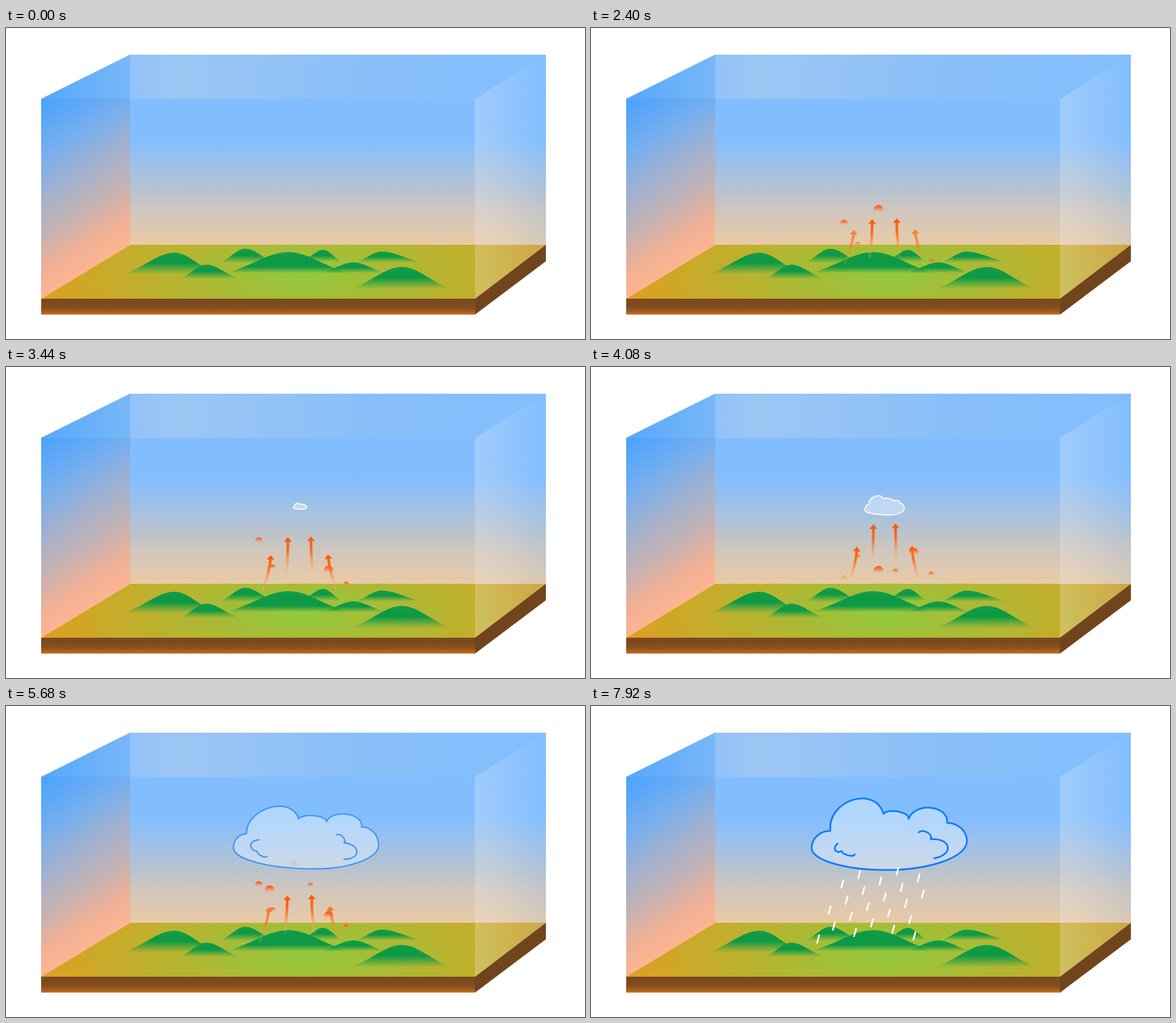
Write an HTML page with a canvas that moves like this. It is 1021 px wide and 548 px high and loops after 8 s.

```html
<!DOCTYPE html>
<html lang="en">
<head>
<meta charset="utf-8">
<title>Cloud formation</title>
<style>
html, body { margin: 0; width: 100%; height: 100%; overflow: hidden; background: #fff; }
canvas { display: block; width: 100vw; height: 100vh; }
</style>
</head>
<body>
<canvas id="stage" width="1021" height="548"></canvas>
<script>
const W = 1021, H = 548, LOOP = 8000, STEP = 80;
const stage = document.getElementById('stage').getContext('2d');

const clamp = v => Math.max(0, Math.min(1, v));
const lerp = (a, b, k) => a + (b - a) * k;
// Blends numbers or nested lists of numbers.
const mix = (a, b, k) => Array.isArray(a) ? a.map((v, i) => mix(v, b[i], k)) : lerp(a, b, k);

function gradient(c, x0, y0, x1, y1, stops) {
  const g = c.createLinearGradient(x0, y0, x1, y1);
  stops.forEach(([at, color]) => g.addColorStop(at, color));
  return g;
}

function poly(c, fill, ...pts) {
  c.fillStyle = fill;
  c.beginPath();
  pts.forEach(([x, y]) => c.lineTo(x, y));
  c.closePath();
  c.fill();
}

// ---------- scenery ----------

// Corners of the box: front (F) and back (B), left/right, top/bottom.
const FLT = [62, 125], FRT = [827, 125], FLB = [62, 477], FRB = [827, 477];
const BLT = [219, 47], BRT = [952, 47], BLB = [219, 382], BRB = [952, 382];

function drawWalls(c) {
  poly(c, gradient(c, 0, 47, 0, 382, [
    [0, '#82beff'], [0.44, '#82beff'], [0.61, '#a3c1e4'],
    [0.73, '#bac3cc'], [0.82, '#cfc6bd'], [1, '#e9caa5']
  ]), BLT, BRT, BRB, BLB);

  // Colour bands of the left wall run parallel to its lower edge.
  const ux = 0.53, uy = 0.85;
  poly(c, gradient(c, 139 * ux, 139 * uy, 440 * ux, 440 * uy, [
    [0, '#49a2ff'], [0.28, '#76aeee'], [0.5, '#a4b1cd'],
    [0.67, '#c2b2b4'], [0.85, '#eeb097'], [1, '#ffb48f']
  ]), FLT, BLT, BLB, FLB);

  poly(c, gradient(c, 62, 0, 219, 0, [[0, '#55a8fc'], [1, '#78b7f8']]), FLT, BLT, [219, 125]);
  poly(c, gradient(c, 219, 0, 952, 0, [
    [0, '#92c2f9'], [0.1, '#9cc6f4'], [0.2, '#99c5f4'], [0.55, '#89bff9'], [1, '#82beff']
  ]), [219, 125], BLT, BRT, FRT);
}

function drawGround(c) {
  c.save();
  c.beginPath();
  [FLB, BLB, BRB, FRB].forEach(p => c.lineTo(...p));
  c.clip();
  c.translate(525, 435);
  c.scale(460, 170);
  const g = c.createRadialGradient(0, 0, 0, 0, 0, 1);
  [[0, '#92c93d'], [0.3, '#a6bc36'], [0.6, '#bdb12e'], [1, '#dca022']]
    .forEach(([at, color]) => g.addColorStop(at, color));
  c.fillStyle = g;
  c.fillRect(-2, -2, 4, 4);
  c.restore();

  poly(c, gradient(c, 0, 477, 0, 505, [
    [0, '#7a481f'], [0.5, '#814d20'], [0.75, '#985820'], [1, '#c87222']
  ]), FLB, FRB, [827, 505], [62, 505]);
  poly(c, '#71451c', FRB, BRB, [952, 411], [827, 505]);
}

// Smooth slope between a foot and a peak, drawn upwards or downwards.
function slope(c, foot, peak, up) {
  const low = mix(foot, peak, 0.5), high = [lerp(foot[0], peak[0], 0.7), peak[1]];
  c.bezierCurveTo(...(up ? [...low, ...high, ...peak] : [...high, ...low, ...foot]));
}

function hill(c, left, peak, right, top, base, solid = 0.48) {
  c.fillStyle = gradient(c, 0, top, 0, base, [
    [0, '#149d49'], [0.3, '#0e9945'], [solid, '#0e9945'], [1, 'rgba(14,153,69,0)']
  ]);
  c.beginPath();
  c.moveTo(left, base);
  slope(c, [left, base], [peak, top], true);
  slope(c, [right, base], [peak, top], false);
  c.fill();
}

function drawHills(c) {
  hill(c, 378, 422, 474, 389, 414);
  hill(c, 522, 559, 592, 391, 412);
  hill(c, 618, 662, 733, 394, 413);
  hill(c, 209, 297, 371, 396, 434);
  hill(c, 556, 613, 668, 413, 432);
  hill(c, 390, 498, 602, 395, 432, 0.7);
  hill(c, 308, 353, 410, 417, 442);
  hill(c, 610, 698, 783, 421, 460);
}

function drawGlass(c) {
  poly(c, gradient(c, 827, 0, 952, 0, [
    [0, 'rgba(240,240,238,.27)'], [0.4, 'rgba(225,232,240,.2)'], [1, 'rgba(130,190,255,.16)']
  ]), FRT, BRT, BRB, FRB);
}

const scenery = document.createElement('canvas');
scenery.width = W;
scenery.height = H;
{
  const c = scenery.getContext('2d');
  c.fillStyle = '#fff';
  c.fillRect(0, 0, W, H);
  [drawWalls, drawGround, drawHills, drawGlass].forEach(draw => draw(c));
}

// ---------- rising air ----------

const warmth = t => clamp((6800 - t) / 560) ** 1.6;

const BUBBLE_LIFE = 2480;

// Larger bubbles rise faster.
function bubble(c, t, x, y0, r, start) {
  if (t < start) return;
  const age = (t - start) % BUBBLE_LIFE;
  const y = y0 - (0.0275 + (r - 5) * 0.006) * age;
  c.globalAlpha = clamp((age + 60) / 520) * clamp((BUBBLE_LIFE - age) / 600) * warmth(t);
  c.fillStyle = gradient(c, 0, y - r, 0, y + r * 0.5, [
    [0, '#ff5a08'], [0.4, 'rgba(255,100,35,.8)'], [1, 'rgba(255,150,95,0)']
  ]);
  c.beginPath();
  c.arc(x, y, r, 0, 7);
  c.fill();
}

function drawBubbles(c, t) {
  bubble(c, t, 507, 390, 8.5, 960);
  bubble(c, t, 446, 377, 6.5, 1500);
  bubble(c, t, 470, 390, 5, 2100);
  bubble(c, t, 600, 420, 5, 2100);
  bubble(c, t, 569, 404, 8.5, 2500);
  bubble(c, t, 537, 371, 5, 3700);
  bubble(c, t, 465, 402, 8.5, 4080);
  c.globalAlpha = 1;
}

function arrow(c, x, y, bend, lean, length) {
  c.strokeStyle = gradient(c, 0, y, 0, y + length, [
    [0, '#ff5a00'], [0.35, 'rgba(255,90,0,.8)'], [1, 'rgba(255,190,140,.1)']
  ]);
  c.lineWidth = 4.7;
  c.beginPath();
  c.moveTo(x - lean * 0.2, y + 7);
  c.quadraticCurveTo(x - lean, y + length * 0.5, x - bend, y + length);
  c.stroke();
  c.save();
  c.translate(x, y);
  c.rotate(Math.atan2(lean, length * 0.5));
  poly(c, '#ff5a00', [0, -1], [6.8, 7], [-6.8, 7]);
  c.restore();
}

const ARROW_START = 1720, ARROW_LIFE = 3200;

function drawArrows(c, t) {
  if (t < ARROW_START) return;
  const age = (t - ARROW_START) % ARROW_LIFE, k = age / ARROW_LIFE;
  const out = clamp((ARROW_LIFE - age) / 400) * warmth(t);
  for (const mirrored of [false, true]) {
    c.save();
    if (mirrored) {
      c.translate(1035, -1.5);
      c.scale(-1, 1);
    }
    c.globalAlpha = clamp(age / 1050) * out;
    arrow(c, lerp(462, 471.5, k), lerp(373, 298, k), lerp(20, 11, k), lerp(6, 1, k), 62);
    c.globalAlpha = clamp(age / 600) * out;
    arrow(c, lerp(495, 499.2, k), lerp(362, 248.5, k), lerp(6, 0, k), 0.3, 68);
    c.restore();
  }
  c.globalAlpha = 1;
}

// ---------- cloud ----------

// rim: left end, four notches, right end, bottom. Folds: three points each.
const YOUNG = {
  rim: [[459, 257], [471, 239], [513, 223], [544, 231], [563, 236], [575, 252], [530, 271]],
  left: [[484, 248], [487, 253], [490, 255]],
  right: [[538, 244], [547, 250], [552, 256]],
  puff: 0.46, ink: [255, 255, 255], width: 1.8
};
const GROWN = {
  rim: [[401, 250], [424, 225], [516, 199], [565, 204], [627, 213], [657, 245], [545, 287]],
  left: [[446, 236], [443, 256], [460, 265]],
  right: [[582, 227], [596, 241], [596, 270]],
  puff: 0.46, ink: [62, 150, 247], width: 2.4
};
const FULL = {
  rim: [[389, 250], [422, 220], [516, 190], [560, 199], [628, 206], [663, 238], [520, 289]],
  left: [[434, 244], [441, 257], [464, 263]],
  right: [[579, 221], [600, 233], [606, 267]],
  puff: 0.54, ink: [12, 123, 255], width: 3
};
const SEED = {
  ...YOUNG,
  rim: YOUNG.rim.map(([x, y]) => [518.5 + (x - 517) * 0.2, 245.5 + (y - 243) * 0.18])
};

const STAGES = [[3440, SEED], [4720, YOUNG], [5680, GROWN], [6160, FULL]];

function cloudAt(t) {
  const i = Math.max(1, STAGES.findIndex(([at]) => t < at));
  const last = t >= 6160;
  const [t0, from] = STAGES[last ? 2 : i - 1], [t1, to] = STAGES[last ? 3 : i];
  let k = clamp((t - t0) / (t1 - t0));
  if (from === YOUNG) k = k ** 0.6;
  return Object.fromEntries(Object.keys(from).map(key => [key, mix(from[key], to[key], k)]));
}

// Bulging curve from a to b; a negative bulge turns to the other side.
function lobe(c, a, b, bulge) {
  const dx = b[0] - a[0], dy = b[1] - a[1];
  const nx = dy * bulge, ny = -dx * bulge;
  c.bezierCurveTo(a[0] + dx * 0.12 + nx, a[1] + dy * 0.12 + ny, b[0] + nx, b[1] + ny, ...b);
}

// Quarter of an ellipse, leaving a upright or level.
function quarter(c, a, b, upright) {
  const corner = upright ? [a[0], b[1]] : [b[0], a[1]];
  c.bezierCurveTo(...mix(a, corner, 0.55), ...mix(b, corner, 0.55), ...b);
}

function traceRim(c, [left, n1, n2, n3, n4, right, bottom], puff) {
  c.beginPath();
  c.moveTo(...left);
  quarter(c, left, n1, true);
  lobe(c, n1, n2, puff);
  lobe(c, n2, n3, puff * 0.5);
  lobe(c, n3, n4, puff * 0.85);
  quarter(c, n4, right, false);
  quarter(c, right, bottom, true);
  quarter(c, bottom, left, false);
  c.closePath();
}

function drawFold(c, [a, b, d], first, second, shift) {
  c.save();
  c.translate(shift, -1.5 * shift);
  c.beginPath();
  c.moveTo(...a);
  lobe(c, a, b, first);
  lobe(c, b, d, second);
  c.stroke();
  c.restore();
}

function drawCloud(c, t) {
  if (t < 3120) return;
  const cloud = cloudAt(t);
  c.globalAlpha = clamp((t - 3040) / 320);
  c.lineCap = c.lineJoin = 'round';
  c.lineWidth = cloud.width;
  c.strokeStyle = `rgb(${cloud.ink.map(Math.round)})`;
  c.fillStyle = 'rgba(225,240,255,.5)';
  traceRim(c, cloud.rim, cloud.puff);
  c.fill();
  c.stroke();

  // Folds appear with the young cloud and wobble between two poses at the end.
  c.globalAlpha = clamp((t - 4080) / 640);
  const shift = t >= 6960 && Math.floor((t - 6960) / 240) % 2 === 0 ? 1 : 0;
  drawFold(c, cloud.left, -0.85, -0.25, shift);
  drawFold(c, cloud.right, 0.4, 1.05, -shift);
  c.globalAlpha = 1;
}

// ---------- rain ----------

const DROPS = 22, RAIN_TOP = 283, RAIN_FALL = 125, RAIN_SLANT = 0.28;

function drawRain(c, t) {
  if (t < 7040) return;
  const pose = Math.floor((t - 7040) / 240);
  c.strokeStyle = '#fff';
  c.lineWidth = 3;
  c.lineCap = 'round';
  c.beginPath();
  for (let i = 0; i < DROPS; i++) {
    const fallen = (i / DROPS * RAIN_FALL + pose * 40) % RAIN_FALL;
    const x = 436 + 172 * (i * 0.618 % 1) - fallen * RAIN_SLANT;
    const y = RAIN_TOP + fallen;
    c.moveTo(x, y + 1);
    c.lineTo(x - 13 * RAIN_SLANT, y + 14);
  }
  c.stroke();
}

function draw(now) {
  const t = Math.floor((now % LOOP) / STEP) * STEP;
  stage.drawImage(scenery, 0, 0);
  stage.lineCap = 'butt';
  drawArrows(stage, t);
  drawBubbles(stage, t);
  drawCloud(stage, t);
  drawRain(stage, t);
}

let begin;
function tick(now) {
  begin ??= now;
  draw(Math.max(0, now - begin));
  requestAnimationFrame(tick);
}
draw(0);
requestAnimationFrame(tick);
</script>
</body>
</html>
```
